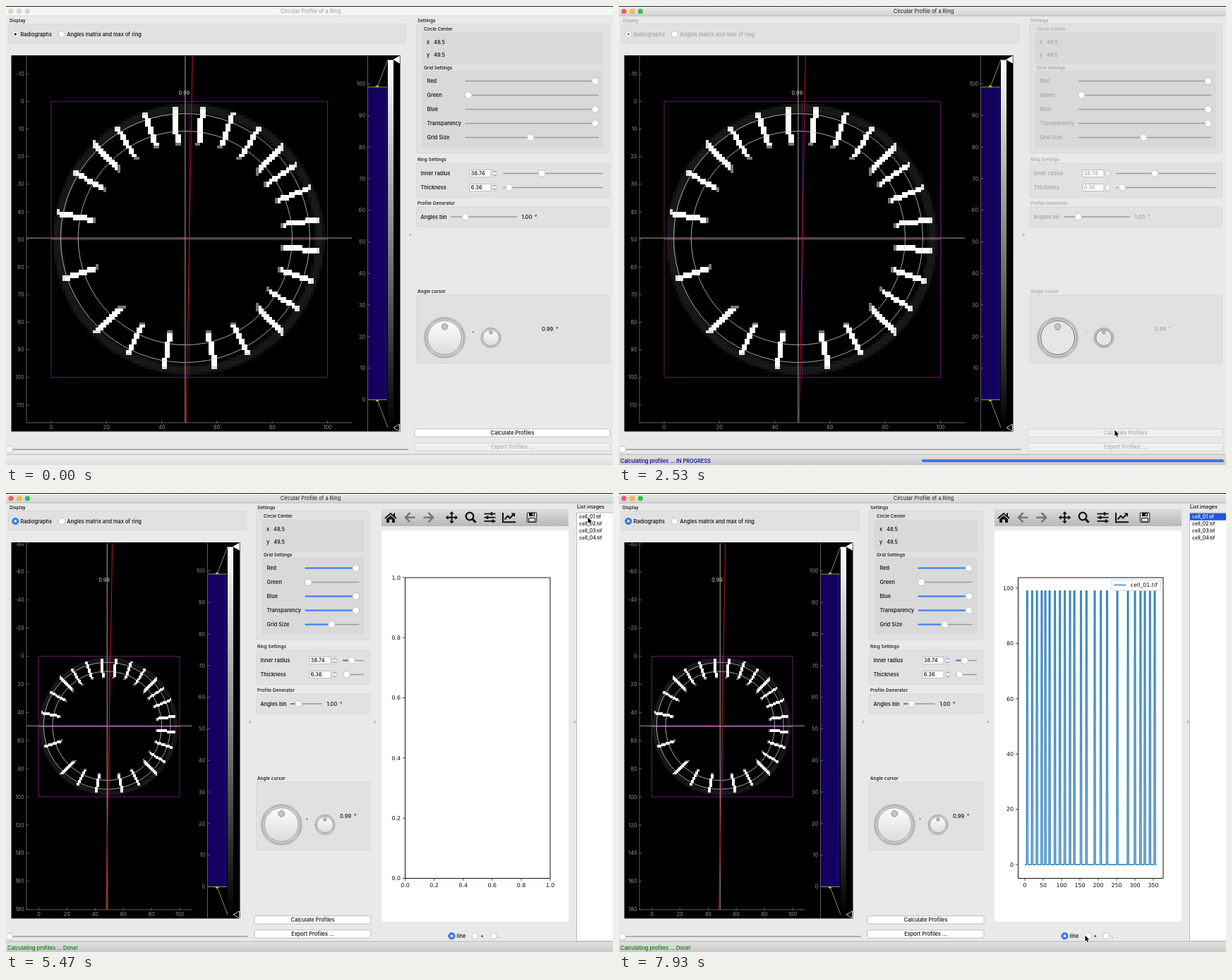
Animation of 860 by 651 pixels, one loop 8 s. Source, as an HTML page with a canvas:

```html
<!DOCTYPE html>
<html lang="en">
<head>
<meta charset="utf-8">
<title>Circular Profile of a Ring</title>
<style>
html, body { margin: 0; width: 100%; height: 100%; overflow: hidden; background: #e9e9e9; }
canvas { display: block; width: 860px; height: 651px; }
</style>
</head>
<body>
<canvas id="stage" width="860" height="651"></canvas>
<script>
const LOOP = 8000, STEP = 200 / 3, DEG = Math.PI / 180;
const ctx = document.getElementById('stage').getContext('2d');
const UI = 'Inter, "Liberation Sans", sans-serif', PLOT = '"DejaVu Sans", sans-serif';
const BLUE = '#3b7df5', INK = '#0c0c0c', AXIS = '#777';

// Direction of each spoke, degrees clockwise from the top
const SPOKES = [6.5, 20, 33, 46, 56, 67.5, 82, 95.5, 109, 123, 135, 153, 168, 190.5, 207, 224, 252, 281, 300, 315, 327, 341, 354];

// Pointer moves: start time, end time, destination
const ENTRY = [781, 491];
const MOVES = [
  [130, 333, 645, 508], [400, 600, 642, 535], [867, 1733, 702, 601], [2667, 3133, 788, 386],
  [3267, 3600, 806, 333], [3733, 4133, 799, 323], [4333, 5000, 823, 25], [5133, 5467, 824, 34],
  [5667, 6267, 824, 46], [6690, 7600, 657, 617], [7667, 7933, 660, 627]
];

function text(s, x, y, { size = 7.4, color = INK, align = 'left', font = UI, weight = 500 } = {}) {
  ctx.font = `${weight} ${size}px ${font}`;
  ctx.fillStyle = color;
  ctx.textAlign = align;
  ctx.fillText(s, x, y + size * .36);
}
function paint(fill, stroke, width = 1) {
  if (fill) { ctx.fillStyle = fill; ctx.fill(); }
  if (stroke) { ctx.strokeStyle = stroke; ctx.lineWidth = width; ctx.stroke(); }
}
function rect(x0, y0, x1, y1, fill, stroke, r = 0) {
  ctx.beginPath();
  ctx.roundRect(x0, y0, x1 - x0, y1 - y0, r);
  paint(fill, stroke);
}
function circle(x, y, r, fill, stroke, width = 1) {
  ctx.beginPath();
  ctx.arc(x, y, r, 0, Math.PI * 2);
  paint(fill, stroke, width);
}
function lines(color, width, ...paths) {
  ctx.beginPath();
  for (const p of paths)
    for (let i = 0; i < p.length; i += 2) i ? ctx.lineTo(p[i], p[i + 1]) : ctx.moveTo(p[i], p[i + 1]);
  paint(null, color, width);
}
function poly(fill, points, stroke, width) {
  ctx.beginPath();
  for (let i = 0; i < points.length; i += 2) ctx.lineTo(points[i], points[i + 1]);
  ctx.closePath();
  paint(fill, stroke, width);
}
function at(x, y, turn, drawPart) {
  ctx.save();
  ctx.translate(x, y);
  ctx.rotate(turn);
  drawPart();
  ctx.restore();
}
function fade(y0, y1, a, b) {
  const g = ctx.createLinearGradient(0, y0, 0, y1);
  g.addColorStop(0, a);
  g.addColorStop(1, b);
  return g;
}

// 100 x 100 pixel radiograph: a faint ring crossed by bright spokes
function makeRing() {
  const c = document.createElement('canvas');
  c.width = c.height = 100;
  const g = c.getContext('2d');
  for (let y = 0; y < 100; y++) for (let x = 0; x < 100; x++) {
    const d = Math.abs(Math.hypot(x + .5 - 49.7, y + .5 - 50) - 47.4);
    const v = Math.round(24 * Math.min(1, Math.max(0, 2.1 - d)));
    g.fillStyle = `rgb(${v},${v},${v})`;
    g.fillRect(x, y, 1, 1);
  }
  for (const angle of SPOKES) {
    const dx = Math.sin(angle * DEG), dy = -Math.cos(angle * DEG);
    const main = Math.max(Math.abs(dx), Math.abs(dy)), steep = Math.abs(dy) === main;
    const w = Math.round(2 / main), n = Math.round(14 * main);
    for (let i = 0; i < n; i++) {
      const r = 48.2 - (i + .5) / main, x = 49.5 + dx * r, y = 49.5 + dy * r;
      g.fillStyle = i === n - 1 ? '#777' : i === 0 ? '#ddd' : '#fff';
      if (steep) g.fillRect(Math.round(x - w / 2), Math.floor(y), w, 1);
      else g.fillRect(Math.floor(x), Math.round(y - w / 2), 1, w);
    }
  }
  return c;
}
const ring = makeRing();

function stateAt(t) {
  const wide = t < 2670, disabled = t >= 2270 && wide;
  return {
    wide, disabled,
    frame: Math.floor((t + 4) / STEP),
    progress: Math.min(1, (t - 2266) / 260),
    dx: wide ? 0 : -227,
    pick: (a, b) => wide ? a : b,
    active: t >= 930,
    accent: t >= 1000 && !disabled,
    pressed: t >= 2130 && t < 2270,
    selected: t >= 5730,
    plotted: t >= 5870,
    ink: disabled ? '#a3a3a3' : INK
  };
}

function drawWindow(s) {
  rect(0, 0, 860, 651, '#e9e9e9');
  rect(0, 0, 860, 14, s.active ? fade(1, 14, '#e9e9e9', '#d3d3d3') : '#f6f6f6');
  rect(0, 0, 860, 1, '#242434');
  rect(0, 13.5, 860, 14.5, s.active ? '#b9b9b9' : '#dadada');
  ['#fc5b57', '#fdbc2e', '#28c840'].forEach((c, i) =>
    circle(7 + i * 11.7, 7.7, 3.4, s.active ? c : '#d9d9d9', s.active ? 'rgba(0,0,0,.15)' : '#c8c8c8', .6));
  text('Circular Profile of a Ring', 431.5, 7.7, { align: 'center', color: s.active ? '#333' : '#a6a6a6' });
  rect(0, 636, 860, 651, s.accent || s.disabled ? fade(636, 651, '#e2e2e2', '#c9c9c9') : fade(636, 651, '#f0f0f0', '#dedede'));
  rect(0, 635.5, 860, 636.5, '#b4b4b4');
  if (s.disabled) {
    text('Calculating profiles ... IN PROGRESS', 2, 645, { color: '#00008b' });
    rect(429, 643, 857, 647, '#d2d2d2', null, 2);
    rect(429, 643, 429 + 428 * s.progress, 647, '#4275e8', null, 2);
  } else if (!s.wide) text('Calculating profiles ... Done!', 2, 645, { color: '#007a00' });
}

function radio(s, x, y, label, on) {
  const blue = on && s.accent;
  circle(x, y, 4.7, blue ? BLUE : '#fff', blue ? '#2f6fe0' : '#b2b2b2', .8);
  if (on) circle(x, y, 1.7, blue ? '#fff' : s.disabled ? '#8a8a8a' : '#222');
  text(label, x + 7.3, y, { color: s.ink });
}
function slider(s, x0, x1, y, value, filled = true) {
  const knob = x0 + 4.8 + (x1 - x0 - 9.6) * value;
  rect(x0, y - .8, x1, y + .8, '#9c9c9c', null, .8);
  if (s.accent && filled) rect(x0, y - 1, knob, y + 1, BLUE, null, 1);
  circle(knob, y, 4.8, '#fff', '#b3b3b3', .8);
}
function group(s, label, x0, y0, x1, y1, inner) {
  text(label, x0 + (inner ? 3 : 2), y0 - 4.6, { size: 6.5, color: s.ink });
  rect(x0 + .5, y0 + .5, x1 - .5, y1 - .5, inner ? '#d9d9d9' : '#e1e1e1', '#d7d7d7', 2);
}
function button(label, x0, x1, y, enabled, pressed) {
  rect(x0, y - 5.7, x1, y + 5.7, pressed ? fade(y - 6, y + 6, '#5ea2f8', '#1c6cf0') : enabled ? '#fff' : '#f0f0f0',
    enabled ? '#bcbcbc' : '#d2d2d2', 2);
  text(label, (x0 + x1) / 2, y, { align: 'center', color: pressed ? '#fff' : enabled ? INK : '#adadad' });
}
function spin(s, x, y, value) {
  rect(x, y - 5, x + 30, y + 5, '#fff', '#bdbdbd');
  text(value, x + 1.8, y, { color: s.ink });
  rect(x + 32.5, y - 5.3, x + 38.5, y + 5.3, '#fff', '#c4c4c4', 2.5);
  const c = x + 35.5;
  for (const d of [-1, 1]) lines(s.ink, .9, [c - 1.5, y + d * 1.8, c, y + d * 3.4, c + 1.5, y + d * 1.8]);
}
function dial(s, x, y, r, rim, ticks, notch) {
  for (let i = 0; i < ticks; i++)
    at(x, y, i / ticks * Math.PI * 2, () => lines('#606060', .7, [r + 1.5, 0, rim, 0]));
  circle(x, y, r, s.disabled ? '#e6e6e6' : fade(y - r, y + r, '#fdfdfd', '#dcdcdc'), s.disabled ? '#555' : '#8a8a8a', .9);
  circle(x, y - r * .65, notch, '#c4c4c4', '#7c7c7c', .8);
}

function drawControls(s) {
  const { pick, dx } = s, color = { color: s.ink };
  const left = 581 + dx, right = pick(855, 516), inner = left + 8, innerRight = right - 9;
  const label = left + 6.5;

  group(s, 'Display', 3, 25, pick(567, 341), 53);
  radio(s, 13.3, 40, 'Radiographs', true);
  radio(s, 79, 40, 'Angles matrix and max of ring', false);
  slider(s, 0, pick(570, 343), 629, 0, false);

  group(s, 'Settings', left, 25, right, 209);
  group(s, 'Circle Center', inner, 37.5, innerRight, 83, true);
  group(s, 'Grid Settings', inner, 92, innerRight, 201, true);
  ['x   48.5', 'y   49.5'].forEach((row, i) => text(row, inner + 7, 51.8 + i * 17.7, color));
  Object.entries({ Red: 1, Green: 0, Blue: 1, Transparency: 1, 'Grid Size': .49 }).forEach(([name, value], i) => {
    const y = 106.5 + i * 20;
    text(name, inner + 7.5, y, color);
    slider(s, inner + 61.5, innerRight - 6.5, y, value);
  });

  group(s, 'Ring Settings', left, 222.5, right, 272);
  [['Inner radius', '38.74', .38], ['Thickness', '6.36', .03]].forEach(([name, shown, value], i) => {
    const y = 237.5 + i * 20;
    text(name, label, y, color);
    spin(s, left + 76, y, shown);
    slider(s, left + 123, innerRight, y, value);
  });

  group(s, 'Profile Generator', left, 284.5, right, 313);
  const binEnd = pick(724, 448);
  text('Angles bin', label, 299.2, color);
  slider(s, left + 49, binEnd, 299, .19);
  text('1.00  °', binEnd + 6.5, 299.2, color);

  group(s, 'Angle cursor', left, 409.5, right, 507);
  dial(s, pick(621.5, 390.3), 470.5, 24, 29.5, 76, 4.3);
  dial(s, pick(687, 452), 470.5, 11.5, 14.3, 64, 2.2);
  circle(pick(662, 426.5), 462.5, .8, s.ink);
  text('0.99  °', pick(759, 473), 458.7, color);

  button('Calculate Profiles', left - 2, right + 1, 605.5, !s.disabled, s.pressed);
  button('Export Profiles ...', left - 2, right + 1, 625.5, !s.wide);
  for (const x of s.wide ? [573] : [346, 522.5, 806]) circle(x, 324.5, 1.5, '#c6c6c6', '#b2b2b2', .6);
}

function drawViewer(s) {
  const { pick, dx } = s;
  const x0 = pick(64, 46.5), y0 = pick(135.3, 231.5), k = pick(3.915, 1.995);
  const X = v => x0 + v * k, Y = v => y0 + v * k;
  const right = 490 + dx, dim = { size: 7.3, color: '#969696', weight: 400 };
  rect(7.5, 70, 558.5 + dx, 603.5, '#000');

  ctx.save();
  ctx.beginPath();
  ctx.rect(8, 71, 551 + dx, 532);
  ctx.clip();
  const step = pick(10, 20);
  for (let v = pick(-10, -80); v <= pick(110, 180); v += step) {
    text(v, 25.5, Y(v), { ...dim, align: 'right' });
    lines(AXIS, .8, [28, Y(v), 32, Y(v)]);
  }
  for (let v = 0; v <= 100; v += 20) {
    text(v, X(v), 597, { ...dim, align: 'center' });
    lines(AXIS, .8, [X(v), 588, X(v), 592]);
  }
  ctx.beginPath();
  ctx.rect(29, 71, right - 29, 520);
  ctx.clip();
  ctx.imageSmoothingEnabled = false;
  ctx.drawImage(ring, x0, y0, 100 * k, 100 * k);
  ctx.strokeStyle = '#6e1f78';
  ctx.lineWidth = .9;
  ctx.strokeRect(x0, y0, 100 * k, 100 * k);
  lines('#a83ab0', 1, [X(0), Y(50), X(100), Y(50)]);
  lines('#4a1a90', .9, [X(50), Y(0), X(50), Y(100)]);
  const cx = X(48.5), cy = Y(49.5), lean = Math.tan(.99 * DEG);
  for (const r of [38.74, 38.74 + 6.36]) circle(cx, cy, r * k, null, '#d0d0d0', .8);
  lines('#a8a890', 1, [cx, 71, cx, 591], [29, cy, right, cy]);
  lines('#b01414', 1.1, [X(50) + (Y(50) - 71) * lean, 71, X(50) - (591 - Y(50)) * lean, 591]);
  ctx.restore();
  lines(AXIS, .8, [29, 71, 29, 591, right, 591]);
  text('0.99', pick(252.3, 139), 123, { align: 'center', color: '#d8d8d8', weight: 400 });
  at(dx, 0, 0, () => drawLevels(dim));
}

function drawLevels(dim) {
  const Y = v => 558.5 - v * 4.48;
  rect(513, Y(99), 540, Y(0), '#14005e');
  lines('#1c0c90', 1, [537.5, Y(99), 537.5, Y(0)]);
  lines(AXIS, .8, [512.5, 71, 512.5, 603]);
  for (let v = 0; v <= 100; v += 10) {
    text(v, 509, Y(v), { ...dim, align: 'right' });
    lines(AXIS, .8, [512, Y(v), 516, Y(v)]);
  }
  rect(541, 76.5, 549, 598, fade(76, 598, '#fff', '#000'));
  for (const [y, end, out, fill] of [[Y(99), 76, -3, '#fff'], [Y(0), 598, 3, '#000']]) {
    lines('#8c8c58', 1, [513, y, 540, y]);
    lines('#9a9a78', .9, [526, y, 541, end]);
    poly('#c8c83c', [523, y, 529, y, 526, y + out]);
    poly(fill, [549, end, 557.5, end - 5, 557.5, end + 5], '#ddd', .9);
  }
}

function drawToolbar() {
  const ink = '#111', grey = '#777', mid = 34.7;
  rect(532, 22.5, 797, 47, fade(22, 47, '#dedede', '#b8b8b8'));
  lines(ink, 2, [537, 36, 545, 29, 553, 36]);
  poly(ink, [539, 37, 545, 32, 551, 37, 551, 42, 539, 42]);
  rect(543, 37.5, 547, 42, '#c4c4c4');
  rect(549, 28.5, 551, 33, ink);
  for (const [x, d] of [[572.5, -1], [598.5, 1]])
    lines(grey, 2.6, [x, 28, x + d * 6.5, mid, x, 41.3], [x + d * 6, mid, x - d * 7, mid]);
  for (let i = 0; i < 4; i++) at(631.5, mid, i * Math.PI / 2, () => {
    poly(ink, [0, -8.7, 3.3, -5, -3.3, -5]);
    rect(-1, -6, 1, 0, ink);
  });
  circle(657, 33, 5.3, null, ink, 2.3);
  lines(ink, 3, [661, 37, 665.5, 41.8]);
  [688, 682, 690].forEach((x, i) => {
    const y = 29.5 + i * 5.2;
    lines(ink, 1.8, [677.5, y, 693.5, y]);
    rect(x - 1.3, y - 2.3, x + 1.3, y + 2.3, ink);
  });
  lines(ink, 2, [704, 28, 704, 41.3, 722, 41.3], [706.5, 37.5, 711, 32.5, 714, 35.5, 719, 30.5]);
  poly(ink, [715.5, 28.5, 721, 28.5, 721, 34]);
  rect(738.3, 28, 751.8, 41.3, '#ddd', ink, 1);
  rect(741, 28, 749, 33, ink);
  rect(746, 29, 747.7, 32, '#ddd');
  rect(740.5, 35.5, 749.5, 41, null, ink);
}

function drawPlot(s) {
  const style = { size: 7.9, font: PLOT, weight: 400 };
  const xTick = (x, label) => {
    lines('#111', .8, [x, 546.5, x, 549.8]);
    text(label, x, 556.2, { ...style, align: 'center' });
  };
  const yTick = (y, label) => {
    lines('#111', .8, [562, y, 565.5, y]);
    text(label, 559, y, { ...style, align: 'right' });
  };
  rect(532, 53, 797, 608, '#fff');
  if (s.plotted) {
    const X = a => 575 + a * .52, Y = v => 527 - v * 3.92;
    const pulses = SPOKES.flatMap(a => [X(a - 2), Y(0), X(a - 1.5), Y(99), X(a + 1.5), Y(99), X(a + 2), Y(0)]);
    ctx.lineJoin = 'round';
    lines('#1f77b4', 1.35, [X(0), Y(0), ...pulses, X(359), Y(0)]);
    ctx.lineJoin = 'miter';
    for (let v = 0; v <= 350; v += 50) xTick(X(v), v);
    for (let v = 0; v <= 100; v += 20) yTick(Y(v), v);
    rect(698, 123.3, 767.5, 138.3, 'rgba(255,255,255,.8)', '#d0d0d0', 2);
    lines('#1f77b4', 1.3, [701.5, 130.5, 718, 130.5]);
    text('cell_01.tif', 724.8, 130.3, style);
  } else {
    for (let i = 0; i <= 5; i++) {
      const label = (i / 5).toFixed(1);
      xTick(565.5 + i * 41.1, label);
      yTick(546.5 - i * 85.35, label);
    }
  }
  rect(565.5, 120, 771, 546.5, null, '#111');
}

function drawResults(s) {
  drawToolbar();
  drawPlot(s);
  ['line', '+', '.'].forEach((label, i) => radio(s, 631.5 + i * 29.5 + (i === 1 ? 4 : 0), 628.3, label, i === 0));
  text('List images', 809, 19.3, { size: 7.2 });
  rect(808.5, 28, 861, 635.5, '#fff', '#bcbcbc');
  if (s.selected) rect(809, 28.7, 860, 38.7, '#1f57d8');
  for (let i = 0; i < 4; i++)
    text(`cell_0${i + 1}.tif`, 812, 33.7 + i * 10, { size: 7, color: s.selected && !i ? '#fff' : INK });
}

function drawPointer(t) {
  if (t < 130) return;
  let [x, y] = ENTRY;
  for (const [t0, t1, toX, toY] of MOVES) {
    const k = Math.min(1, Math.max(0, (t - t0) / (t1 - t0))), e = k * k * (3 - 2 * k);
    x += (toX - x) * e;
    y += (toY - y) * e;
  }
  at(x + .5, y + .5, 0, () => {
    const arrow = [0, 0, 0, 8.4, 1.8, 6.7, 3.1, 9.6, 4.5, 9, 3.2, 6.2, 5.7, 6.1];
    poly('#fff', arrow, '#fff', 1.3);
    poly('#000', arrow);
  });
}

function draw(t) {
  const s = stateAt(t);
  drawWindow(s);
  drawControls(s);
  drawViewer(s);
  if (!s.wide) drawResults(s);
  drawPointer(s.frame * STEP);
}

const start = performance.now();
function tick() {
  draw((performance.now() - start) % LOOP);
  requestAnimationFrame(tick);
}
tick();
</script>
</body>
</html>
```
